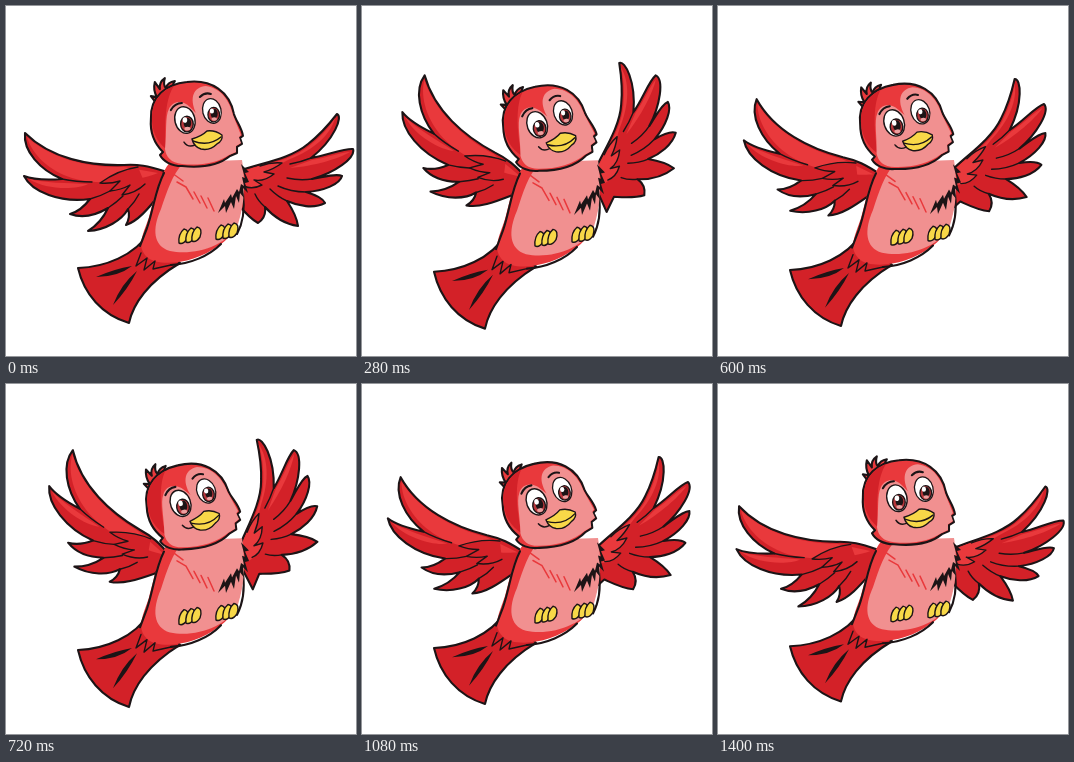
An HTML page that plays this animation: 350x350 px, repeating every 1440 ms.

```html
<!DOCTYPE html>
<html lang="en">
<head>
<meta charset="utf-8">
<title>Flying bird</title>
<style>
  html, body { margin: 0; width: 100%; height: 100%; overflow: hidden; background: #fff; }
  svg { display: block; width: 100vw; height: 100vh; }
  path, ellipse { stroke-linejoin: round; stroke-linecap: round; }
  .ink { stroke: #1c1416; stroke-width: 2.1; }
  .thin { stroke: #1c1416; stroke-width: 1.4; }
  .line { fill: none; }
  .red { fill: #e9393c; }
  .deep { fill: #d32128; }
  .pink { fill: #f19090; }
  .gold { fill: #f8d848; }
  .white { fill: #fff; }
  .black { fill: #1c1416; }
  .fluff { fill: none; stroke: #e9393c; stroke-width: 1.5; }
</style>
</head>
<body>
<svg viewBox="0 0 350 350">
  <defs>
    <path id="toe" d="M0 0Q-1 -9 5 -14Q11 -13 8 -4Q4 2 0 0Z"/>
    <g id="foot" class="gold thin">
      <use href="#toe"/><use href="#toe" x="7" y="-1"/><use href="#toe" x="13" y="-2"/>
    </g>
    <g id="eye">
      <ellipse class="white thin" rx="10" ry="13.5" transform="rotate(-14)"/>
      <ellipse class="thin" cx="2" cy="4" rx="6.3" ry="7.8" fill="#b8363b"/>
      <ellipse class="black" cx="2.5" cy="3" rx="3.8" ry="5.4"/>
      <ellipse class="white" cx="0" cy="0" rx="2.3" ry="2.8"/>
      <ellipse cx="2.5" cy="8.6" rx="3" ry="1.9" fill="#eca0a0"/>
    </g>
  </defs>

  <g id="right">
    <path class="deep ink" d="M236 164C255 157 284 153 302 138C315 128 324 117 331 108C337 110 329 133 305 152C320 150 338 142 347 143C350 152 328 167 306 173C318 171 330 167 336 170C334 178 318 185 300 186C310 189 317 192 319 197C308 203 292 200 281 195C287 204 291 212 292 220C278 218 266 209 259 201C260 208 258 213 252 217C243 212 236 203 230 196L214 201L225 175Z"/>
    <path class="red" d="M240 164C260 158 286 154 303 140C316 130 324 120 329 112C325 128 308 144 284 153C270 160 255 168 238 174ZM306 154C320 152 336 146 344 146C332 153 308 160 284 162Z"/>
    <path class="thin line" d="M305 152Q295 156 284 158M306 173Q294 175 281 172M300 186Q285 186 272 180M281 195Q272 191 264 183M259 201Q252 195 249 188"/>
    <path class="red" d="M238 166Q255 157 276 157Q268 163 258 166L268 168Q258 176 248 174L256 179Q246 184 234 180Z"/>
    <path class="thin line" d="M254 160Q265 156 276 157Q268 163 258 166L268 168Q258 176 248 174L256 179Q246 184 238 180"/>
  </g>

  <g id="left">
    <path class="deep ink" d="M158 165C142 160 132 158 118 159C84 160 45 153 19 127C17 145 34 164 56 173C42 174 28 174 18 170C26 186 54 197 84 193C78 201 71 206 64 208C78 213 92 208 102 202C97 213 90 220 82 225C100 224 116 214 122 203C124 209 123 214 120 219C132 215 142 203 154 188Z"/>
    <path class="red" d="M21 131C46 154 85 162 118 161L152 167C135 174 95 181 66 172C44 165 26 149 21 131ZM23 173C38 177 60 177 82 178C70 184 40 184 23 173Z"/>
    <path class="thin line" d="M56 173Q70 176 86 176M84 193Q95 190 104 185M102 202Q111 196 117 190M122 203Q129 196 133 188"/>
    <path class="deep thin" d="M132 161Q112 164 94 177Q104 178 114 175L104 185Q115 184 124 179L116 189Q130 187 139 178"/>
  </g>

  <g id="body">
    <path class="deep ink" d="M144 226C128 250 99 261 72 262C78 288 96 309 123 317C127 298 142 276 174 257Z"/>
    <path class="black" d="M126 260Q108 263 90 271Q112 271 126 260ZM131 265Q115 278 107 299Q122 283 131 265Z"/>
    <path class="red" d="M168 152C153 166 149 190 143 211C137 229 130 240 141 251C153 262 190 257 212 240C232 229 240 199 238 164Z"/>
    <path class="ink line" d="M158 167C149 184 148 202 141 222L134 240M165 259C184 258 203 250 215 238M231 228C237 217 239 204 237 188"/>
    <path class="thin line" d="M135 247L130 260L141 252L138 264L149 255L147 263L165 259"/>
    <path class="pink" d="M178 156C166 169 161 185 155 203C146 223 147 240 164 245C188 250 222 240 232 218C238 200 240 178 236 154Z"/>
    <path class="fluff" d="M166 167L177 175M171 176L180 181M180 181L187 193M188 186L194 197M195 190L201 202M202 192L208 205"/>
    <path class="black" d="M235 158L243 166L239 167L243 176L239 177L242 187L237 182L238 192L234 187L233 197L230 190L228 203L225 196L220 207L219 200L212 207L218 193L219 197L225 188L226 192L231 183L233 186L235 178L238 180L236 171L239 172Z"/>
    <use href="#foot" x="173" y="237"/>
    <use href="#foot" x="210" y="233"/>
  </g>

  <g id="head">
    <path class="red ink" d="M151 98L145 90L151 91Q147 84 149 76L154 83Q153 76 159 72Q157 79 160 82Q162 76 169 75Q165 80 168 88Z"/>
    <path class="red ink" d="M145 113C144 91 160 78 181 76C206 73 224 86 228 108C230 115 236 122 237 130L234 132L236 138L231 141L231 147L224 150C213 159 195 162 176 160C165 160 157 155 154 149L157 146C148 137 144 125 145 113Z"/>
    <path class="deep" d="M146 113C146 95 155 85 168 80C160 92 158 115 160 143C150 135 146 124 146 113Z"/>
    <path class="pink" d="M159 143C161 125 159 111 163 103C167 94 177 94 184 101L190 107C183 91 188 81 200 80C215 82 224 95 227 109L235 129L233 131L235 137L230 140L230 146L223 149C211 157 194 160 176 158C165 157 160 151 159 143Z"/>
    <use href="#eye" x="179" y="114"/>
    <use href="#eye" transform="translate(206 105) scale(.92)"/>
    <path class="ink line" d="M165 104Q169 97 176 97M194 91Q199 86 205 88"/>
    <path class="gold thin" d="M186 133Q196 130 201 125Q209 124 216 129Q217 135 211 138Q204 145 195 143Q188 141 186 133Z"/>
    <path class="thin line" d="M178 136Q182 142 189 139M187 135Q203 141 215 131"/>
  </g>
</svg>
<script>
const LOOP = 1440, FLAP = 480, STEP = 40;
const NOD_PEAKS = [-20, 460, 1420], NOD_REACH = 240;
const move = (id, value) => document.getElementById(id).setAttribute('transform', value);

// Head swings right around each peak and rests on the left between them
function nod(t) {
  const d = Math.min(...NOD_PEAKS.map(p => Math.abs(t - p)), NOD_REACH);
  return Math.cos(Math.PI / 2 * d / NOD_REACH) ** 2;
}

function draw(t) {
  const lift = (1 - Math.cos(2 * Math.PI * t / FLAP)) / 2;
  move('left', `rotate(${32 * lift} 149 180)`);
  move('right', `rotate(${-50 * lift} 235 168)`);
  move('body', `translate(0 150) scale(1 ${1 + .036 * lift}) translate(0 -150)`);
  move('head', `translate(0 ${3 * lift}) rotate(${-7.3 * (1 - nod(t))} 195 150)`);
}

const start = performance.now();
function tick() {
  const t = (performance.now() - start) % LOOP;
  draw(Math.floor(t / STEP) * STEP);
  requestAnimationFrame(tick);
}
tick();
</script>
</body>
</html>
```
